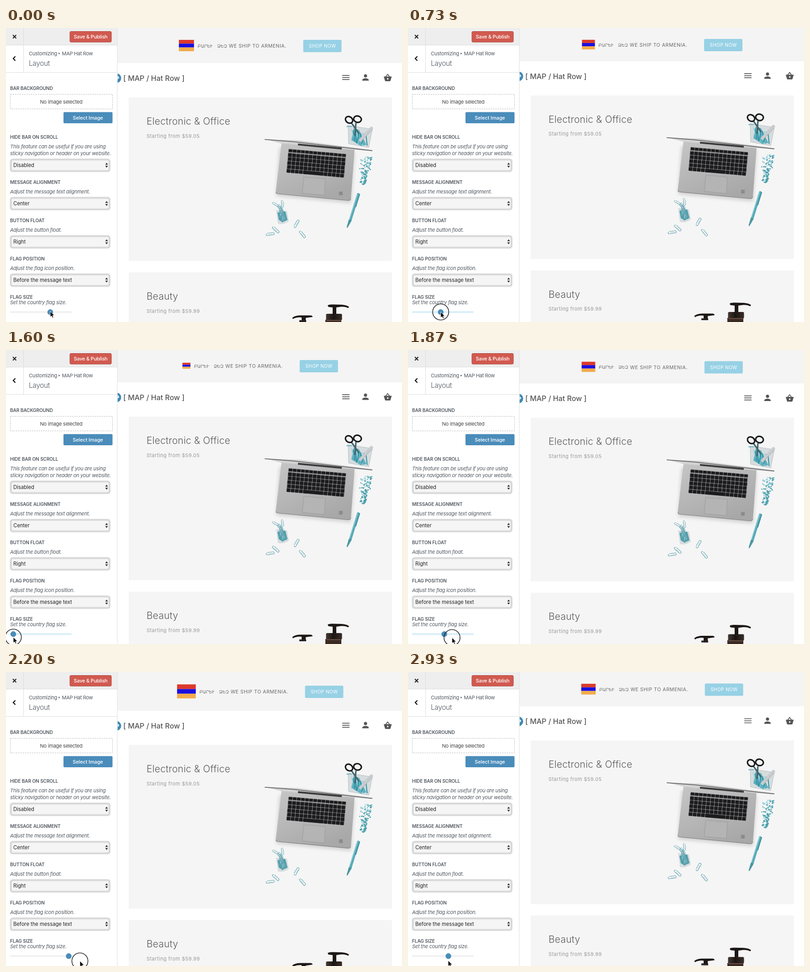
An HTML page for the animation above (2.99 s loop, 868 by 645 pixels).

```html
<!DOCTYPE html>
<html lang="en">
<head>
<meta charset="utf-8">
<title>Top bar customizer</title>
<style>
  html, body { margin: 0; width: 100%; height: 100%; overflow: hidden; background: #fff; }
  svg { display: block; width: 868px; height: 645px; font-family: Inter, Roboto, sans-serif; }
  text { white-space: pre; }
</style>
</head>
<body>
<svg id="stage" viewBox="0 0 868 645"></svg>
<script>
const LOOP = 2990, STEP = 1000 / 15;

// Timelines: [ms, value...]
const knobKeys = [[0, 97], [530, 97], [730, 72], [1070, 44], [1130, 39], [1270, 16], [1650, 16],
  [1870, 80.5], [2060, 137.5], [2330, 137.5], [2470, 113], [2600, 74], [2667, 88.5], [2990, 88.5]];
const pointerKeys = [[0, 97, 621.5], [530, 97, 622], [730, 72, 623], [1130, 33, 624], [1270, 13, 626],
  [1600, 16, 630], [1870, 97.5, 631], [2060, 146, 633], [2200, 162, 634], [2330, 148, 634],
  [2470, 109.5, 633], [2600, 67, 633], [2667, 88, 633], [2990, 88, 633]];

let seed = 7;
const random = () => (seed = seed * 16807 % 2147483647) / 2147483647;
const repeat = (n, make) => Array.from({ length: n }, (_, i) => make(i)).join('');

// y is the vertical centre of the capitals
const text = (x, y, str, size = 11, fill = '#444', more = '') =>
  `<text x="${x}" y="${y + size * .364}" font-size="${size}" fill="${fill}" ${more}>${str}</text>`;
const rect = (x, y, w, h, fill, more = '') =>
  `<rect x="${x}" y="${y}" width="${w}" height="${h}" fill="${fill}" ${more}/>`;
const shape = (d, fill, more = '') => `<path d="${d}" fill="${fill}" ${more}/>`;
const line = (d, stroke, width = 1, more = '') =>
  shape(d, 'none', `stroke="${stroke}" stroke-width="${width}" ${more}`);
const spaced = n => `letter-spacing="${n}"`;
const middle = 'text-anchor="middle" ';

const label = (y, str) => text(9, y, str, 10, '#50575e', 'font-weight="600" ' + spaced(-.05));
const note = (y, str) => text(9, y, str, 11, '#50575e', 'font-style="italic" ' + spaced(-.24));
const select = (y, str) =>
  rect(9.5, y - 13.5, 218.5, 27.5, '#f5f5f5', 'rx="4"') +
  rect(10.5, y - 12.5, 216.5, 25.5, 'none', 'rx="4" stroke="#c4c4c4" stroke-width="2.6" filter="url(#soft)"') +
  text(16, y, str, 11.2, '#222') +
  shape(`M217.5 ${y - 1.2}h6l-3-4.4zM217.5 ${y + 1.2}h6l-3 4.4z`, '#333');

const defs = `<defs>
  <linearGradient id="metal" x2=".6" y2="1">
    <stop stop-color="#c6c6c6"/><stop offset="1" stop-color="#a8a8a8"/>
  </linearGradient>
  <linearGradient id="pump"><stop stop-color="#453832"/><stop offset=".45" stop-color="#1b1614"/>
    <stop offset="1" stop-color="#3a2d28"/></linearGradient>
  <filter id="soft"><feGaussianBlur stdDeviation="1"/></filter>
  <filter id="shade" x="-20%" y="-20%" width="140%" height="140%"><feGaussianBlur stdDeviation="4"/></filter>
  <clipPath id="view"><path d="M244.5 0H868V645H244.5z"/></clipPath>
</defs>`;

const sidebar =
  rect(0, 0, 244, 645, '#fff') + rect(0, 0, 244, 37, '#eee') +
  line('M0 37.5H244M38.5 0V97M0 97.5H244M244 0V645', '#ddd') +
  line('M15 15.3l7.4 7.4M22.4 15.3l-7.4 7.4', '#222', 2.1) +
  line('M20.5 62.3l-4.6 4.7 4.6 4.7', '#111', 2.2) +
  rect(140, 7.5, 91, 23.5, '#d15a50', 'rx="2.5" stroke="#b34840"') +
  text(185.5, 19, 'Save &amp; Publish', 11, '#fff', middle + 'font-weight="500" ' + spaced(-.24)) +
  text(50, 56, 'Customizing', 11, '#50575e', spaced(-.25)) +
  shape('M115.3 54v4l3.4-2z', '#50575e') +
  text(122.5, 56, 'MAP Hat Row', 11, '#50575e', spaced(-.3)) +
  text(50, 77, 'Layout', 15.5, '#50575e', 'font-weight="300" ' + spaced(-.4)) +
  label(132, 'BAR BACKGROUND') +
  rect(9.5, 145.5, 224, 32, '#fff', 'stroke="#b9b9b9" stroke-dasharray="3 2"') +
  text(121, 162, 'No image selected', 11, '#444', middle + spaced(-.24)) +
  rect(126, 184.5, 107.5, 24.5, '#4a8cba', 'rx="2"') +
  text(179.5, 197, 'Select Image', 11, '#fff', middle + 'font-weight="500" ' + spaced(-.15)) +
  label(239, 'HIDE BAR ON SCROLL') +
  note(260, 'This feature can be useful if you are using') +
  note(274.5, 'sticky navigation or header on your website.') +
  select(301, 'Disabled') +
  label(338, 'MESSAGE ALIGNMENT') + note(359, 'Adjust the message text alignment.') +
  select(385, 'Center') +
  label(422, 'BUTTON FLOAT') + note(443, 'Adjust the button float.') +
  select(469, 'Right') +
  label(506, 'FLAG POSITION') + note(527, 'Adjust the flag icon position.') +
  select(553, 'Before the message text') +
  label(590, 'FLAG SIZE') + note(601.5, 'Set the country flag size.') +
  rect(9, 621.2, 135, 4, '#f1f1f1', 'id="track" rx="1.5"') +
  '<circle id="knob" cy="623.3" r="6.2" fill="#4a8cba"/>';

const clip = (x, y, angle, size = 1) =>
  `<g transform="translate(${x} ${y}) rotate(${angle}) scale(${size})">` +
  line('M-7 -2.6H6.5a2.6 2.6 0 0 1 0 5.2H-8a2 2 0 0 1 0-4', '#62a3ae', 1.1) +
  line('M-5 1H5', '#a9d5dc') + '</g>';

// Keys lie on a slanted grid, 14 columns by 6 rows
const keyboard = `<g transform="matrix(1 .088 -.09 1 620 265.5)">` +
  rect(-1, -.5, 127, 52, '#8f8f90', 'rx="2"') +
  repeat(84, i => {
    const row = Math.floor(i / 14), col = i % 14;
    if (row === 5 && col > 4 && col < 9) return '';
    const x = col * 9 + (row % 2 ? -.4 : 0);
    return rect(x, row * 8.7 + .3, 8.1, row ? 7.8 : 6, '#1c1c1e', 'rx="1"');
  }) + rect(36, 43.8, 44, 7.8, '#1c1c1e', 'rx="1"') + '</g>';

const laptop =
  shape('M600 262L592 368 756 384 764 272z', '#000', 'opacity=".16" filter="url(#shade)"') +
  shape('M604 252L764 266 756 374Q755 379 750 378.5L595 363.5Q591 363 591.5 358z', 'url(#metal)') +
  line('M591.7 360Q592 363 595 363.6L750 378.4Q754.5 378.6 755.5 374', '#8a8a8a', 1.4) +
  shape('M567 244L640 246.5 803 267.5V270L764 267.5 604 253.5z', '#d3d3d3') +
  line('M567 244.6L630 249.5 803 269.3', '#59595b', 1.5) +
  line('M640 255.5L736 264.5', '#3b3b3d', 4) +
  keyboard +
  shape('M652.5 327L700 331 698 367 649.5 362.5z', '#b4b4b4', 'stroke="#969696" stroke-width=".8"') +
  rect(730, 359, 8, 8, '#8b8b8b');

const desk =
  shape('M750 214L803 222 795 262 751 254z', '#d6dcde', 'stroke="#b9c0c2"') +
  shape('M762 220L774 224 790 256 778 259 757 246z', '#4ba9b9', 'opacity=".85"') +
  repeat(9, i => line(`M${757 + i * 4} ${222 + random() * 12}l${random() * 14 - 7} ${16 + random() * 14}`,
    i % 3 ? '#2e8fa1' : '#9fd5dd', 2)) +
  line('M777 246L801 220', '#c9cccf', 7, 'stroke-linecap="round"') +
  line('M779 248L803 223', '#a5a9ab') +
  line('M757 208L774 232M767 208L765 236', '#42646b', 3.2) +
  '<g fill="none" stroke="#17191b" stroke-width="3.2">' +
  '<ellipse cx="752" cy="201.5" rx="8.5" ry="6.8" transform="rotate(35 752 201.5)"/>' +
  '<ellipse cx="770.5" cy="200" rx="8.5" ry="7" transform="rotate(12 770.5 200)"/></g>' +
  repeat(3, i => `<circle cx="${748 + i * 4}" cy="216" r="1.4" fill="#52aebb"/>`) +
  repeat(110, () => {
    const v = random(), spread = v < .55 ? 24 : 13;
    const x = 790 - v * 8 + (random() - .5) * spread, y = 283 + v * 60;
    return `<circle cx="${x}" cy="${y}" r="${1.1 + random()}" fill="${random() < .35 ? '#8acbd4' : '#4d9fac'}"/>`;
  }) +
  line('M772 365L755 420', '#56aab8', 6, 'stroke-linecap="round"') +
  line('M770.5 364L752.5 420', '#9ad3db', 1.5) +
  line('M775.5 364L766.5 393', '#2e7f8d', 1.5) +
  shape('M751.5 420L758 422 748.5 438.5 746.5 437.5z', '#4c96a2') +
  shape('M592 399L616 402 620 424Q607 433 596 429z', '#cfd6d8', 'opacity=".8"') +
  shape('M595 405L612 402 617 421 606 426 598 421z', '#4a9eac') +
  repeat(17, () => clip(598 + random() * 15, 391 + random() * 30, 50 + random() * 75, .75)) +
  clip(591, 387, 30, .8) + clip(606, 386, 85, .8) +
  clip(591.5, 443, 42, .95) + clip(579.5, 452, -8, .95) + clip(637, 429, -60, .95) + clip(650, 453, 50, .95);

const bottles =
  shape('M627.5 636Q632 631 644 630.5L668 630.5Q672 631 672 634L657 636V645H648V635Q636 634 629 638.5z', '#1d1816') +
  rect(643, 641, 15, 4, '#2a221f') +
  shape('M705 609Q706 606.5 715 606.5L736 607Q748 608 752 612L750 614.5Q744 611 735 611.5L724 613V629H716V613L707 612z', '#1d1816') +
  rect(701.5, 627, 35, 14, 'url(#pump)', 'rx="2.5"') +
  rect(700, 640, 35, 25, '#3a2a24') +
  line('M702 641.5H734', '#76594d', 1.5);

const card = (y, h, title, price) =>
  rect(269, y, 577, h, '#f5f5f5') +
  text(308, y + 52.2, title, 21, '#5c5c5c', 'font-weight="300" ' + spaced(.2)) +
  text(308, y + 84.5, 'Starting from ' + price, 11, '#999', spaced(.45));

const page = `<g id="page">` +
  rect(244, -20, 624, 97, '#f4f4f4') +
  '<circle cx="242" cy="110" r="10.5" fill="#3f8ab5"/>' +
  line('M243 113l4-4-2.5-3', '#fff', 2) +
  text(257, 110, '[ MAP / Hat Row ]', 16, '#555', 'font-weight="500"') +
  line('M737 104.2h16M737 108.7h16M737 113.2h16', '#555', 1.7) +
  `<g fill="#555"><circle cx="788" cy="105" r="3.5"/>` +
  shape('M781 115.5v-1.8c0-2.3 4.7-3.5 7-3.5s7 1.2 7 3.5v1.8z', '#555') + '</g>' +
  line('M831.5 108l5-6.6 5 6.6', '#555', 1.7, 'stroke-linejoin="round"') +
  shape('M828 106.5h17.5l-2.7 9q-.4 1.3-1.6 1.3h-8.9q-1.2 0-1.6-1.3z', '#555') +
  '<circle cx="836.7" cy="111.5" r="1.7" fill="#fff"/>' +
  card(152, 359, 'Electronic &amp; Office', '$59.05') +
  card(536, 359, 'Beauty', '$59.99') +
  laptop + desk + bottles + '</g>';

const message = `<g id="flag">` +
  rect(-.5, -.375, 1, .25, '#dd3a2c') + rect(-.5, -.125, 1, .25, '#1a0fe0') +
  rect(-.5, .125, 1, .25, '#f2ac4c') + '</g><g id="message">' +
  text(420, 39.3, 'ԲԱՐԵՒ', 9.5, '#666', 'font-family="DejaVu Sans, sans-serif"') +
  text(463, 39.3, 'ՁԵԶ', 9.5, '#666', 'font-family="DejaVu Sans, sans-serif"') +
  text(488.5, 39.3, 'WE SHIP TO ARMENIA.', 10.5, '#666', spaced(.6)) +
  rect(651.5, 26, 84, 27, '#97d1e5', 'rx="2.5"') +
  text(693.7, 39.6, 'SHOP NOW', 10, '#fff', middle + spaced(.45)) + '</g>';

const pointer = `<g id="pointer">` +
  '<circle id="press" r="17.6" fill="none" stroke="#111" stroke-width="1.4"/>' +
  shape('M0 0V12.6L2.9 10 5 14.4 7.1 13.4 5.1 9.2H9z', '#000', 'stroke="#fff" stroke-width=".9"') + '</g>';

const $ = id => document.getElementById(id);
$('stage').innerHTML = defs + `<g clip-path="url(#view)">${page}${message}</g>` + sidebar + pointer;
const set = (id, name, value) => $(id).setAttribute(name, value);

function at(keys, t) {
  const i = Math.max(1, keys.findIndex(k => k[0] > t));
  const a = keys[i - 1], b = keys[i], f = (t - a[0]) / (b[0] - a[0]);
  return a.slice(1).map((v, n) => v + (b[n + 1] - v) * f);
}

function draw(now) {
  // Steps fall on multiples of 10 ms, up to 4 ms before the even beat
  const t = Math.floor((now % LOOP + 4) / STEP) * STEP;
  const [knob] = at(knobKeys, t), [x, y] = at(pointerKeys, t);
  const width = 22 + .193 * (knob - 39);
  // The bar stops shrinking once the button is taller than the flag
  const low = .06 * Math.max(0, knob - 39);
  const drop = Math.max(low - 6, .2 * (knob - 97));
  const centre = Math.max(low - 4, .1 * (knob - 97));

  set('page', 'transform', `translate(0 ${drop})`);
  set('message', 'transform', `translate(${(width - 33.2) / 2} ${centre})`);
  set('flag', 'transform', `translate(395.5 ${38.5 + centre}) scale(${width})`);
  set('knob', 'cx', knob);
  set('track', 'fill', t > 250 && t < 1980 ? '#d9eef9' : '#f1f1f1');
  set('pointer', 'transform', `translate(${x} ${y})`);
  set('press', 'visibility', t > 390 && t < 2760 ? 'visible' : 'hidden');
}

const start = performance.now();
function tick() {
  draw(performance.now() - start);
  requestAnimationFrame(tick);
}
tick();
</script>
</body>
</html>
```
